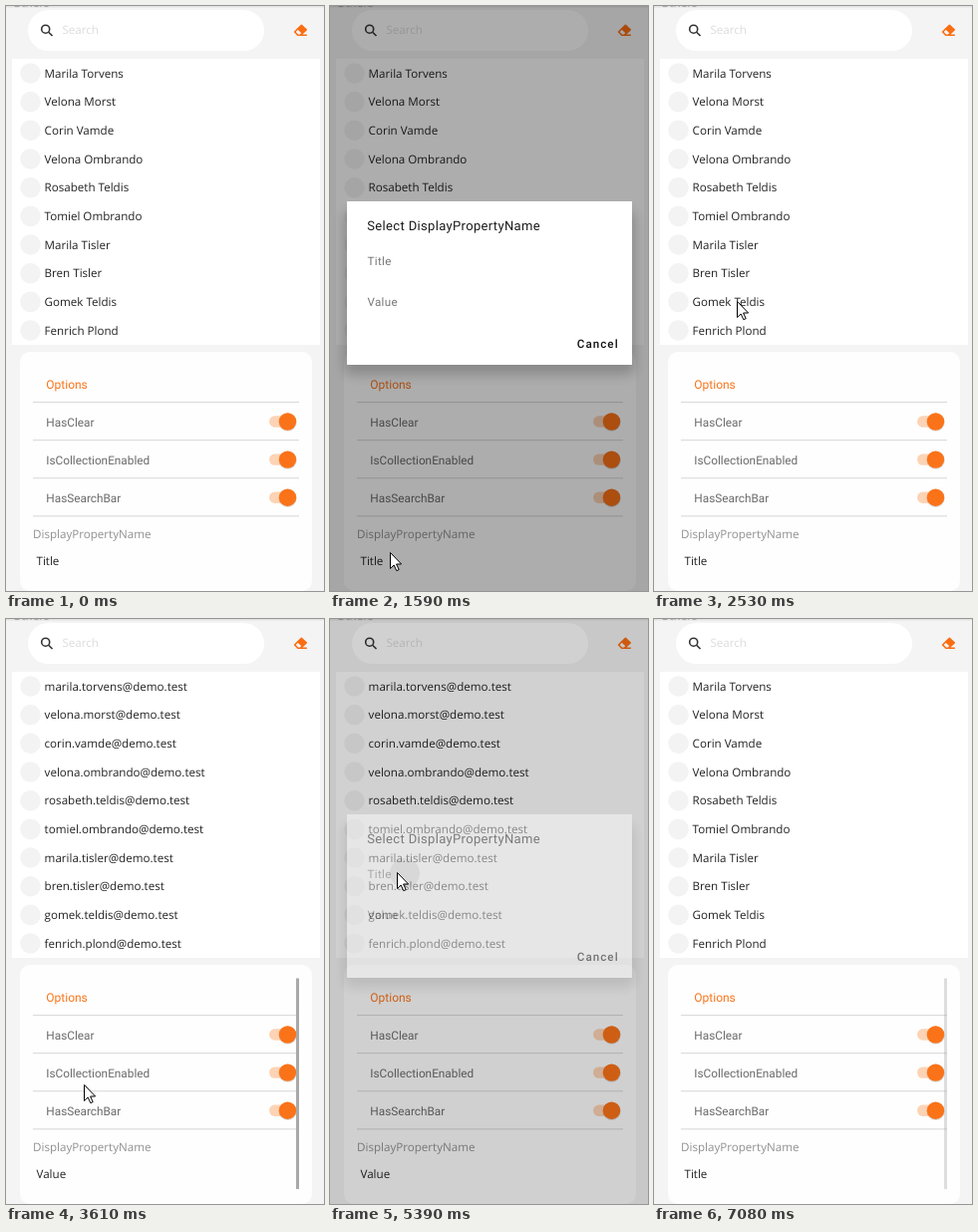
An HTML page that plays this animation: 319x587 px, repeating every 7180 ms.

```html
<!DOCTYPE html>
<html lang="en">
<head>
<meta charset="utf-8">
<title>Picker options</title>
<style>
  html, body { margin: 0; width: 100%; height: 100%; overflow: hidden; background: #f4f4f4; }
  svg { display: block; width: 100%; height: 100%; }
  text { font: 11.6px "Open Sans", sans-serif; fill: #222; text-rendering: geometricPrecision; }
  .rob { font: 11.8px Roboto, sans-serif; fill: #6a6a6a; }
  .item { font-size: 11.6px; letter-spacing: .3px; fill: #777; }
</style>
</head>
<body>
<svg viewBox="0 0 319 587">
  <defs>
    <filter id="soft" x="-20%" y="-20%" width="140%" height="150%"><feGaussianBlur stdDeviation="6"/></filter>
  </defs>
  <rect width="319" height="587" fill="#f4f4f4"/>
  <text x="6.5" y=".8" style="fill:#aaa">Others</text>
  <rect width="319" height="1.5" fill="#000" opacity=".07"/>

  <rect x="22" y="4" width="237" height="41" rx="20.5" fill="#fff"/>
  <g fill="none" stroke="#333" stroke-width="1.6">
    <circle cx="39.7" cy="23.2" r="4"/>
    <path d="M42.7 26.2L46.5 30"/>
  </g>
  <text x="56.5" y="28" style="fill:#dcdcdc">Search</text>
  <g stroke="#fb6d12" stroke-width="1.6" stroke-linejoin="round">
    <path d="M292.8 22.8L296.4 19.3L301.2 23.8L297.4 27.3Z" fill="#fb6d12"/>
    <path d="M292.8 22.8L289.6 26L292.8 29.2H295.4L297.4 27.3M293 29.2H301.8" fill="none"/>
  </g>

  <rect x="6" y="53" width="309" height="287" fill="#fff"/>
  <g id="list"></g>

  <rect x="14" y="347" width="293" height="240" rx="10" fill="#fefefe"/>
  <text class="rob" x="40.3" y="384" style="font-size:12px;fill:#fb7318">Options</text>
  <g id="options"></g>
  <text x="27" y="534" style="fill:#909090">DisplayPropertyName</text>
  <text id="choice" x="30.5" y="561.3"></text>
  <rect id="bar" x="291" y="360.5" width="3" height="211.5" fill="#a9a9a9"/>

  <rect id="scrim" width="319" height="587"/>
  <g id="dialog">
    <rect x="14" y="206" width="292" height="164" rx="8" opacity=".2" filter="url(#soft)"/>
    <rect x="17" y="196" width="286" height="164" fill="#fff"/>
    <text class="rob" x="37.3" y="225" style="font-size:13px;letter-spacing:.34px;fill:#1c1c1c">Select DisplayPropertyName</text>
    <text class="rob item" x="37.6" y="260.3">Title</text>
    <text class="rob item" x="37.6" y="300.5">Value</text>
    <text class="rob" x="247.8" y="342.6" style="font-size:11.6px;font-weight:500;letter-spacing:1.05px;fill:#111">Cancel</text>
    <circle id="ripple" r="15" opacity=".12"/>
  </g>
  <path id="cursor" d="M.5 .5V16.5L4.2 13L6.8 18.7L9.2 17.6L6.6 12H11.6Z" fill="#fff" stroke="#000"/>
</svg>
<script>
const LOOP = 7180;
const $ = id => document.getElementById(id);
const people = ["Marila Torvens", "Velona Morst", "Corin Vamde", "Velona Ombrando", "Rosabeth Teldis",
  "Tomiel Ombrando", "Marila Tisler", "Bren Tisler", "Gomek Teldis", "Fenrich Plond"];
const mails = people.map(p => p.toLowerCase().replace(" ", ".") + "@demo.test");

$("list").innerHTML = people.map((_, i) => {
  const y = 67.5 + i * 28.67;
  return `<circle cx="24.5" cy="${y}" r="10.3" fill="#f3f3f3"/><text x="38.6" y="${y + 4.3}"></text>`;
}).join("");
const rows = document.querySelectorAll("#list text");

$("options").innerHTML = ["HasClear", "IsCollectionEnabled", "HasSearchBar", ""].map((label, i) => {
  const y = 417 + i * 38.1;
  const line = `<rect x="27" y="${y - 20}" width="267" height="1.1" fill="#dadada"/>`;
  return line + (label && `<text class="rob" x="40.3" y="${y + 4.8}">${label}</text>
    <rect x="264" y="${y - 5.7}" width="26" height="11.4" rx="5.7" fill="#fdd3b5"/>
    <circle cx="282.6" cy="${y + .6}" r="9.1" opacity=".14"/>
    <circle cx="282.5" cy="${y}" r="8.7" fill="#fb7318"/>`);
}).join("");

// Cursor path: time, x, y
const path = [
  [520, 1, 586], [840, 44, 561], [1540, 44, 561], [1590, 60, 548], [1720, 104, 482], [1840, 113, 400],
  [1980, 97, 325], [2110, 83, 296], [3370, 83, 296], [3610, 78, 467], [3800, 60, 528], [4080, 50, 554],
  [4130, 50, 554], [4400, 85, 448], [4600, 87, 345], [4870, 72, 266], [5060, 67, 254],
  [6410, 67, 254], [6460, 37, 283], [6520, 37, 283]
];
// Dialog: opening start and end, closing start and end, tapped point
const dialogs = [[1130, 1320, 2340, 2530, 91, 295], [4250, 4440, 5350, 5480, 75, 255]];
const swaps = [3140, 6130];

const clamp = v => Math.min(1, Math.max(0, v));
const ramp = (t, a, b) => clamp((t - a) / (b - a));
const slope = (i, k) => path[i] && path[i + 1] ? (path[i + 1][k] - path[i][k]) / (path[i + 1][0] - path[i][0]) : 0;

// Harmonic tangents keep the path smooth without overshoot
function tangent(i, k) {
  const a = slope(i - 1, k), b = slope(i, k);
  return a * b > 0 ? 2 * a * b / (a + b) : 0;
}

function along(t, k) {
  const i = path.findLastIndex(p => p[0] <= t), p = path[i], q = path[i + 1];
  if (!q) return p[k];
  const d = q[0] - p[0], u = (t - p[0]) / d, v = 1 - u;
  return Math.round(v * v * (1 + 2 * u) * p[k] + u * u * (3 - 2 * u) * q[k]
    + d * u * v * (v * tangent(i, k) - u * tangent(i + 1, k)));
}

let shown;
function fill(mail) {
  if (mail === shown) return;
  shown = mail;
  rows.forEach((row, i) => row.textContent = (mail ? mails : people)[i]);
  $("choice").textContent = mail ? "Value" : "Title";
}

function draw(t) {
  fill(t >= swaps[0] && t < swaps[1]);

  const shownAt = t >= swaps[1] ? swaps[1] : swaps[0];
  $("bar").setAttribute("opacity", t < shownAt ? 0 : 1 - ramp(t, shownAt + 800, shownAt + 1050));

  const [openA, openB, shutA, shutB, x, y] = dialogs[t < 3000 ? 0 : 1];
  const open = ramp(t, openA, openB), left = 1 - ramp(t, shutA, shutB);
  $("scrim").setAttribute("opacity", .32 * Math.sqrt(open) * left ** 1.5);
  $("dialog").setAttribute("opacity", (1 - (1 - open) ** 3) * left ** 2);
  $("ripple").setAttribute("transform", `translate(${x} ${y})`);
  $("ripple").style.display = t >= shutA ? "" : "none";

  const visible = t >= 560 && t < 6520;
  $("cursor").style.display = visible ? "" : "none";
  if (visible) $("cursor").setAttribute("transform", `translate(${along(t, 1)} ${along(t, 2)})`);
}

const start = performance.now();
function tick() {
  draw((performance.now() - start) % LOOP);
  requestAnimationFrame(tick);
}
tick();
</script>
</body>
</html>
```
